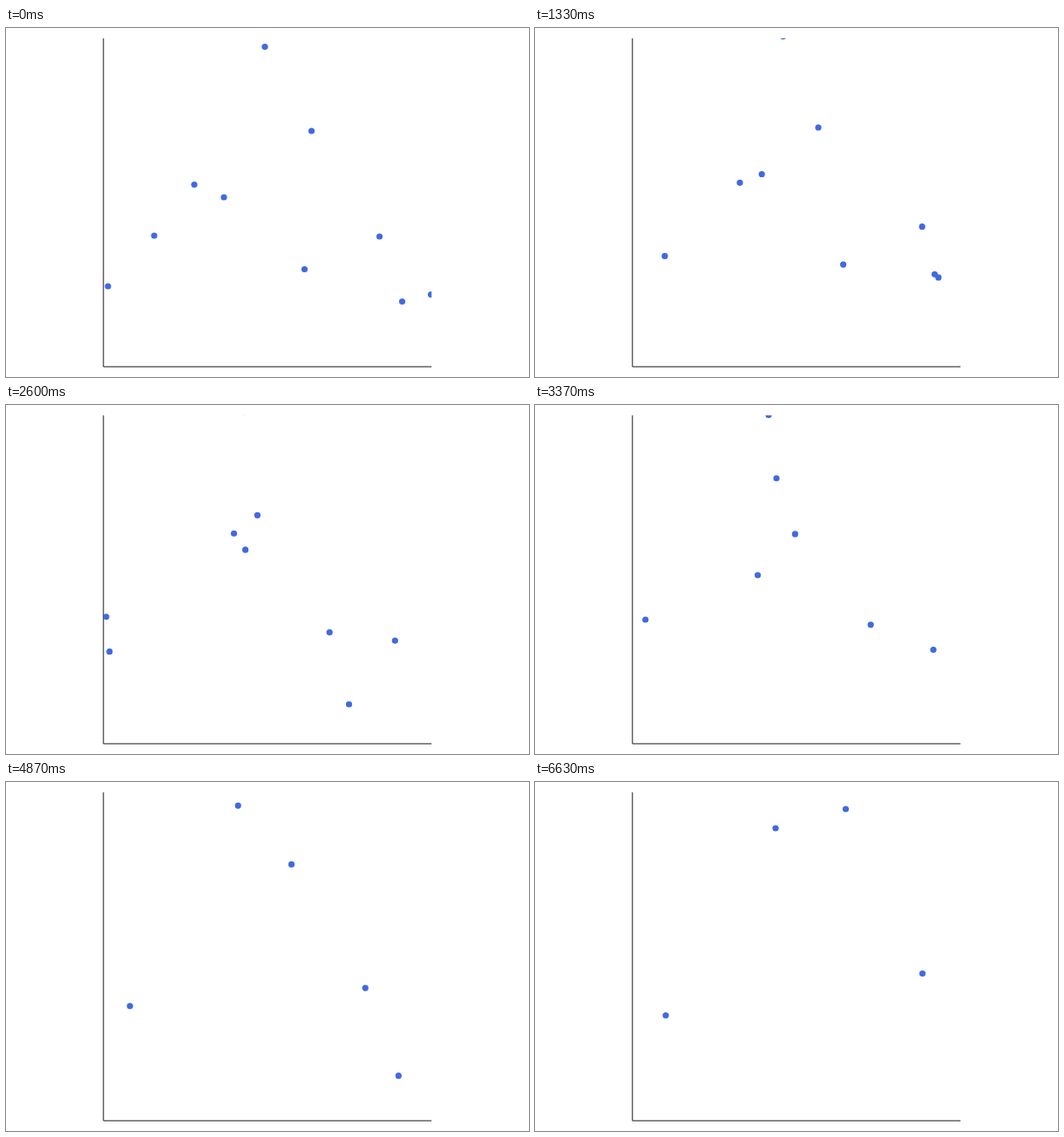
An HTML page with a canvas for the animation above (6660 ms loop, 600 px wide and 400 px high).

```html
<!DOCTYPE html>
<html lang="en">
<head>
<meta charset="utf-8">
<title>Particles under gravity</title>
<style>
  html, body { margin: 0; width: 100%; height: 100%; overflow: hidden; background: #fff; }
  canvas { display: block; }
</style>
</head>
<body>
<canvas id="stage" width="600" height="400"></canvas>
<script>
const ctx = document.getElementById('stage').getContext('2d');
const LOOP = 6660, STEP = 100 / 3, LAST = 199;
const LEFT = 111.8, TOP = 11.8, SIZE = 376.4, RADIUS = 3.6;
const bodies = []; // each maps a step to [x, y], or to nothing while absent

// Tangent at knot i: slope of the parabola through it and its neighbours
function tangent(ts, vs, i) {
  const c = Math.min(Math.max(i, 1), ts.length - 2);
  const slope = j => (vs[j + 1] - vs[j]) / (ts[j + 1] - ts[j]);
  const bend = (slope(c) - slope(c - 1)) / (ts[c + 1] - ts[c - 1]);
  return slope(c - 1) + bend * (2 * ts[i] - ts[c - 1] - ts[c]);
}

function spline(ts, vs, t) {
  let i = 0;
  while (i < ts.length - 2 && t >= ts[i + 1]) i++;
  const h = ts[i + 1] - ts[i], u = (t - ts[i]) / h, w = 1 - u;
  return w * w * ((1 + 2 * u) * vs[i] + u * h * tangent(ts, vs, i)) +
    u * u * ((3 - 2 * u) * vs[i + 1] - w * h * tangent(ts, vs, i + 1));
}

// A smooth course through one [x, y] point per key step
function glide(steps, ...points) {
  const xs = points.map(p => p[0]), ys = points.map(p => p[1]);
  bodies.push(t => t >= steps[0] && t <= steps[steps.length - 1] &&
    [spline(steps, xs, t), spline(steps, ys, t)]);
}

// A close pass that throws two bodies apart with opposite velocities
function slingshot(step, x, y, vx, vy) {
  for (const side of [1, -1])
    bodies.push(t => t >= step && [x + side * vx * (t - step), y + side * vy * (t - step)]);
}

// Left pair: one leaves, swings round outside and replaces the other
bodies.push(t => [117 - 0.6 * t, 296 - 0.5 * t]);
glide([60, 101, 170, LAST], [104, 241], [126.7, 246], [147, 262.5], [150, 267.5]);
glide([0, 23, 56, 88], [170, 238], [158, 251.5], [138.5, 270.5], [108, 288]);

// Central trio
const centre = [0, 23, 56, 95];
glide(centre, [216, 179.5], [221.5, 178], [251.5, 175], [294.2, 155]);
glide(centre, [250, 194], [260.5, 178], [258.5, 158.5], [266.25, 139.5]);
glide(centre, [350.5, 118], [336.5, 115], [312, 116], [266.25, 139.5]);
slingshot(95, 266.25, 139.5, 1.79, -9.25);
glide([95, 122, LAST], [294.2, 155], [312.5, 123], [356.5, 31]);

// Right trio
const right = [0, 23, 56, 74];
glide(right, [428.5, 239], [438, 231], [450, 230], [457.5, 243]);
glide(right, [454.5, 313.5], [455, 299.5], [467, 269], [457.5, 243]);
slingshot(74, 457.5, 243, 16, -25);
glide([0, 23, 56, 101, 122, LAST],
  [487.5, 305.5], [478, 294], [442, 273.5], [457, 280.5], [454.5, 307.5], [436, 394.5]);

// Slow drifters
glide([0, 23, 101, 122, LAST], [297, 21.5], [290, 13.5], [268, 11.5], [266, 18], [276, 53]);
glide([0, 56, 122, LAST], [342.5, 276.5], [360, 267.5], [398, 244], [444.5, 219.5]);

function line(x1, y1, x2, y2) {
  ctx.beginPath();
  ctx.moveTo(x1, y1);
  ctx.lineTo(x2, y2);
  ctx.stroke();
}

function draw(ms) {
  const t = Math.min(LAST, Math.floor((ms % LOOP + 3.4) / STEP));
  ctx.fillStyle = '#fff';
  ctx.fillRect(0, 0, 600, 400);

  ctx.strokeStyle = '#1a1a1a';
  line(LEFT, TOP, LEFT, TOP + SIZE);
  line(LEFT, TOP + SIZE, LEFT + SIZE, TOP + SIZE);

  ctx.save();
  ctx.beginPath();
  ctx.rect(LEFT, TOP, SIZE, SIZE);
  ctx.clip();
  ctx.fillStyle = '#4169e1';
  for (const body of bodies) {
    const at = body(t);
    if (!at) continue;
    ctx.beginPath();
    ctx.arc(...at, RADIUS, 0, 2 * Math.PI);
    ctx.fill();
  }
  ctx.restore();
}

const start = performance.now();
function tick() {
  draw(performance.now() - start);
  requestAnimationFrame(tick);
}
tick();
</script>
</body>
</html>
```
